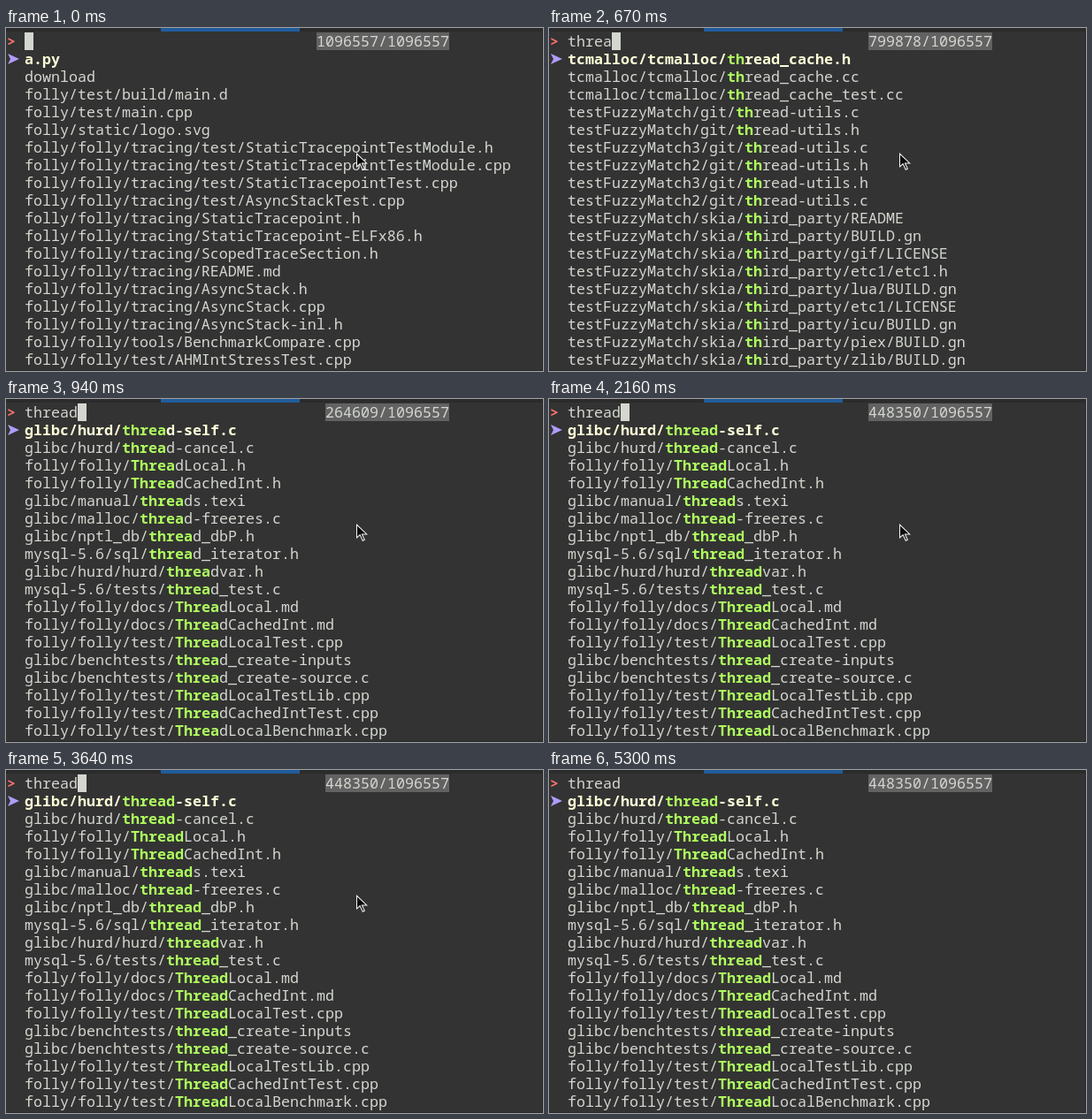
These frames come from a looping animation (607x388 px, 5580 ms). An HTML page with a canvas:

```html
<!DOCTYPE html>
<html lang="en">
<head>
<meta charset="utf-8">
<title>Fuzzy finder</title>
<style>
  html, body { margin: 0; width: 100%; height: 100%; overflow: hidden; background: #333; }
  canvas { display: block; }
</style>
</head>
<body>
<canvas id="stage" width="607" height="388"></canvas>
<script>
const ctx = document.getElementById('stage').getContext('2d');
const LOOP = 5580, CELL = 10, ROW = 20, LEFT = 1, TOP = 5, TOTAL = 1096557;
const FONT = '16.667px "Noto Sans Mono", "DejaVu Sans Mono", monospace';
const COLORS = {
  back: '#333333', strip: '#2b2b2b', tab: '#215d9c', text: '#d3d7cf', current: '#ffffd7',
  match: '#afff5f', prompt: '#ff7070', pointer: '#af9cff', counter: '#626262'
};

const expand = (prefix, names) => names.split(' ').map(name => prefix + name);

const allFiles = [
  'a.py', 'download', 'folly/test/build/main.d', 'folly/test/main.cpp', 'folly/static/logo.svg',
  ...expand('folly/folly/tracing/',
    'test/StaticTracepointTestModule.h test/StaticTracepointTestModule.cpp ' +
    'test/StaticTracepointTest.cpp test/AsyncStackTest.cpp StaticTracepoint.h ' +
    'StaticTracepoint-ELFx86.h ScopedTraceSection.h README.md AsyncStack.h AsyncStack.cpp AsyncStack-inl.h'),
  'folly/folly/tools/BenchmarkCompare.cpp', 'folly/folly/test/AHMIntStressTest.cpp'
];

const tFiles = expand('tcmalloc/tcmalloc/',
  'arena.h arena.cc common.h common.cc span.h span.cc stats.h stats.cc sampler.h sampler.cc ' +
  'pagemap.h pagemap.cc tcmalloc.h tcmalloc.cc cpu_cache.h cpu_cache.cc page_heap.h page_heap.cc');

const cacheFiles = expand('tcmalloc/tcmalloc/', 'thread_cache.h thread_cache.cc thread_cache_test.cc');
const utilFiles = expand('testFuzzyMatch',
  '/git/thread-utils.c /git/thread-utils.h 3/git/thread-utils.c ' +
  '2/git/thread-utils.h 3/git/thread-utils.h 2/git/thread-utils.c');

const thFiles = [
  ...cacheFiles, ...utilFiles,
  ...expand('testFuzzyMatch/skia/third_party/',
    'README BUILD.gn gif/LICENSE etc1/etc1.h lua/BUILD.gn etc1/LICENSE icu/BUILD.gn piex/BUILD.gn zlib/BUILD.gn')
];

const threadFiles = [
  ...expand('glibc/hurd/', 'thread-self.c thread-cancel.c'),
  ...expand('folly/folly/', 'ThreadLocal.h ThreadCachedInt.h'),
  ...expand('glibc/', 'manual/threads.texi malloc/thread-freeres.c nptl_db/thread_dbP.h'),
  'mysql-5.6/sql/thread_iterator.h', 'glibc/hurd/hurd/threadvar.h', 'mysql-5.6/tests/thread_test.c',
  ...expand('folly/folly/', 'docs/ThreadLocal.md docs/ThreadCachedInt.md test/ThreadLocalTest.cpp'),
  ...expand('glibc/benchtests/', 'thread_create-inputs thread_create-source.c'),
  ...expand('folly/folly/test/', 'ThreadLocalTestLib.cpp ThreadCachedIntTest.cpp ThreadLocalBenchmark.cpp')
];

const thrFiles = [
  ...cacheFiles, ...utilFiles, ...threadFiles.slice(0, 8),
  'folly/folly/synchronization/test/ThreadCachedIntTest.cpp'
];

// Each step lists only what changes at that time.
const steps = [
  { at: 0, query: '', files: allFiles, match: '', count: TOTAL, row: 0, caret: true, mouse: 0 },
  { at: 280, query: 't' },
  { at: 400, query: 'th', files: tFiles, match: 't', count: 948216 },
  { at: 550, query: 'thre', count: 986403 },
  { at: 670, query: 'threa', files: thFiles, match: 'th', count: 799878 },
  { at: 820, query: 'thread', files: thrFiles, match: 'thr', count: 612904 },
  { at: 940, files: threadFiles, match: 'threa', count: 264609 },
  { at: 1090, count: 329874 },
  { at: 1210, count: 396021 },
  { at: 1330, match: 'thread', count: 448350 },
  { at: 1450, caret: false },
  { at: 2160, caret: true },
  { at: 2570, row: 1 },
  { at: 2720, row: 2 },
  { at: 2840, row: 3 },
  { at: 3240, row: 2 },
  { at: 3390, row: 1 },
  { at: 3640, row: 0 },
  { at: 4230, caret: false },
  { at: 4510, mouse: 0.15 },
  { at: 4630, mouse: 0.5 },
  { at: 4750, mouse: 0.85, caret: true },
  { at: 4870, mouse: 1 },
  { at: 5020, mouse: null },
  { at: 5300, caret: false }
];

const stateAt = time => Object.assign({}, ...steps.filter(step => step.at <= time));
const cellX = col => LEFT + col * CELL;
const cellY = row => TOP + row * ROW;

function box(x, y, w, h, color) {
  ctx.fillStyle = color;
  ctx.fillRect(x, y, w, h);
}

function write(text, col, row, color, bold) {
  ctx.font = (bold ? 'bold ' : '') + FONT;
  ctx.fillStyle = color;
  ctx.fillText(text, cellX(col), cellY(row) + 16);
}

function shape(points, color) {
  ctx.beginPath();
  points.forEach(([x, y]) => ctx.lineTo(x, y));
  ctx.closePath();
  ctx.fillStyle = color;
  ctx.fill();
}

function drawFile(name, row, match, current) {
  const start = match ? name.toLowerCase().indexOf(match) : 0;
  const end = start + match.length;
  const color = current ? COLORS.current : COLORS.text;
  write(name.slice(0, start), 2, row, color, current);
  write(name.slice(start, end), 2 + start, row, COLORS.match, true);
  write(name.slice(end), 2 + end, row, color, current);
}

function drawMouse(progress) {
  ctx.save();
  ctx.translate(Math.round(396 + 115 * progress), Math.round(141 + 132 * progress));
  shape([[0, 0], [0, 17], [4, 13.5], [7, 20], [10, 18.5], [7.2, 12.5], [13, 12.5]], '#f4f4f4');
  shape([[1, 2.4], [1, 14.7], [4.3, 11.8], [7.5, 18.5], [8.6, 18], [5.6, 11.5], [10.6, 11.5]], '#0a0a0a');
  ctx.restore();
}

function draw(time) {
  const s = stateAt(time);
  box(0, 0, 607, 388, COLORS.back);
  box(0, 0, 607, 4, COLORS.strip);
  box(175, 0, 157, 4, COLORS.tab);
  box(606, 4, 1, 384, COLORS.strip);
  box(0, 387, 607, 1, COLORS.strip);

  write('>', 0, 0, COLORS.prompt, true);
  write(s.query, 2, 0, COLORS.text);
  if (s.caret) box(cellX(2 + s.query.length), TOP, CELL, ROW, COLORS.text);

  const counter = s.count + '/' + TOTAL;
  const col = 50 - counter.length;
  box(cellX(col), TOP, counter.length * CELL, ROW, COLORS.counter);
  write(counter, col, 0, COLORS.text);

  s.files.forEach((name, i) => drawFile(name, i + 1, s.match, i === s.row));
  const y = cellY(s.row + 1) + 10;
  shape([[2, y - 6], [15, y], [2, y + 6], [5, y]], COLORS.pointer);
  if (s.mouse !== null) drawMouse(s.mouse);
}

const began = performance.now();
function tick() {
  draw((performance.now() - began) % LOOP);
  requestAnimationFrame(tick);
}
tick();
</script>
</body>
</html>
```
